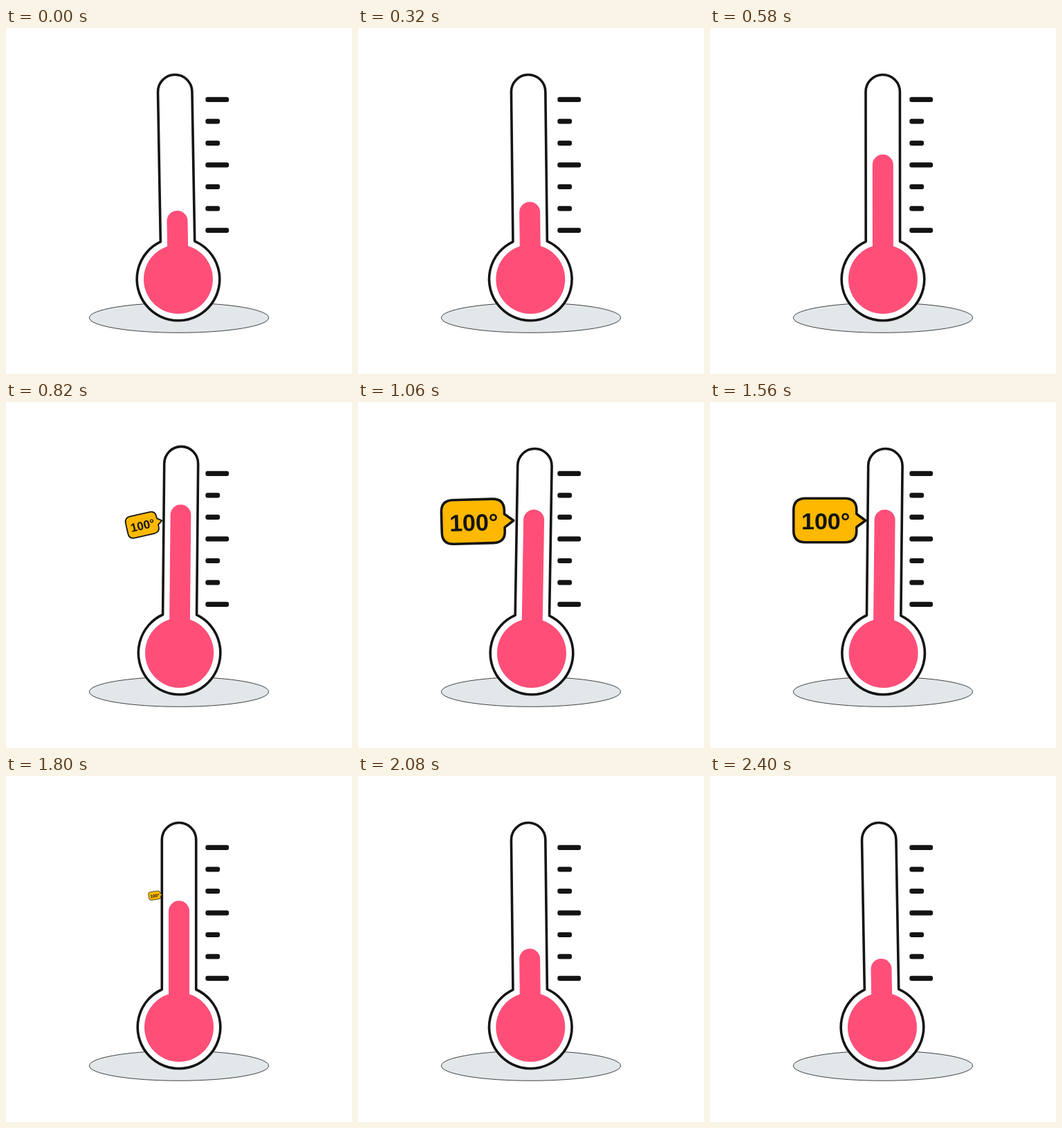
Write an HTML page that moves like this. It is 500 px wide and 500 px high and loops after 2440 ms.

```html
<!DOCTYPE html>
<html lang="en">
<head>
<meta charset="utf-8">
<title>Thermometer</title>
<style>
  html, body { margin: 0; width: 100%; height: 100%; overflow: hidden; background: #fff; }
  svg { display: block; width: 100vw; height: 100vh; }
  .line { stroke: #141414; stroke-width: 3.6; stroke-linejoin: round; }
  .red { fill: #ff4f79; }
  text { font: bold 34px "Liberation Sans", Arial, sans-serif; text-anchor: middle; fill: #141414; }
</style>
</head>
<body>
<svg viewBox="0 0 500 500">
  <ellipse cx="250" cy="418.7" rx="129.6" ry="21.6" fill="#e2e7ea" stroke="#141414" stroke-width=".8"/>
  <g id="ticks" fill="#141414"></g>
  <g id="thermo">
    <path class="line" fill="#fff" d="M225.3 308.5V92.2a24.7 24.7 0 0 1 49.4 0V308.5A59.8 59.8 0 1 1 225.3 308.5Z"/>
    <circle class="red" cx="250" cy="363" r="50"/>
    <rect class="red" id="level" x="235" width="30" rx="15"/>
  </g>
  <!-- The badge's local zero is the tip of its pointer. -->
  <g id="badge">
    <path class="line" fill="#ffb800" d="M-88 -32H-31Q-14 -32 -14 -15V-9.5L-1 0L-14 9.5V15Q-14 31.5 -31 31.5H-88Q-105 31.5 -105 15V-15Q-105 -32 -88 -32Z"/>
    <text x="-58.6" y="13.2">100°</text>
  </g>
</svg>
<script>
const LOOP = 2440, SWING = 2400, STEP = 20;
const $ = id => document.getElementById(id);
const thermo = $('thermo'), level = $('level'), badge = $('badge');

for (let i = 0; i < 7; i++) {
  const tick = document.createElementNS('http://www.w3.org/2000/svg', 'rect');
  const box = { x: 288.3, y: 99.8 + 31.5 * i, width: i % 3 ? 20.8 : 33.8, height: 7.2, rx: 3 };
  for (const k in box) tick.setAttribute(k, box[k]);
  $('ticks').append(tick);
}

const ease = p => (1 - Math.cos(Math.PI * p)) / 2;

// Eased value at time t from [time, value] keys
function track(keys, t) {
  if (t <= keys[0][0]) return keys[0][1];
  for (let i = 1; i < keys.length; i++) {
    const [t0, a] = keys[i - 1], [t1, b] = keys[i];
    if (t < t1) return a + (b - a) * ease((t - t0) / (t1 - t0));
  }
  return keys[keys.length - 1][1];
}

const LEVEL = [[186, 264], [800, 150.5], [1000, 155.5], [1600, 155.5], [2230, 264]];
const STRETCH = [[640, 0], [820, 0.009], [1000, 0]];
const SCALE = [[680, 0], [960, 1], [1600, 1], [1880, 0]];
const TILT = [[680, -16], [1160, 0], [1600, 0], [2000, -16]];

function draw(ms) {
  const t = Math.min(SWING, Math.floor(ms % LOOP / STEP) * STEP);
  const angle = -Math.cos(2 * Math.PI * t / SWING);
  const s = track(STRETCH, t);
  thermo.setAttribute('transform',
    `translate(250 423) rotate(${angle}) scale(${1 - s} ${1 + s}) translate(-250 -423)`);

  const top = track(LEVEL, t);
  level.setAttribute('y', top);
  level.setAttribute('height', 363 - top);

  const size = track(SCALE, t);
  badge.setAttribute('visibility', size > 0 ? 'visible' : 'hidden');
  badge.setAttribute('transform', `translate(225.8 171.2) rotate(${track(TILT, t)}) scale(${size})`);
}

const start = performance.now();
function frame() {
  draw(performance.now() - start);
  requestAnimationFrame(frame);
}
frame();
</script>
</body>
</html>
```
